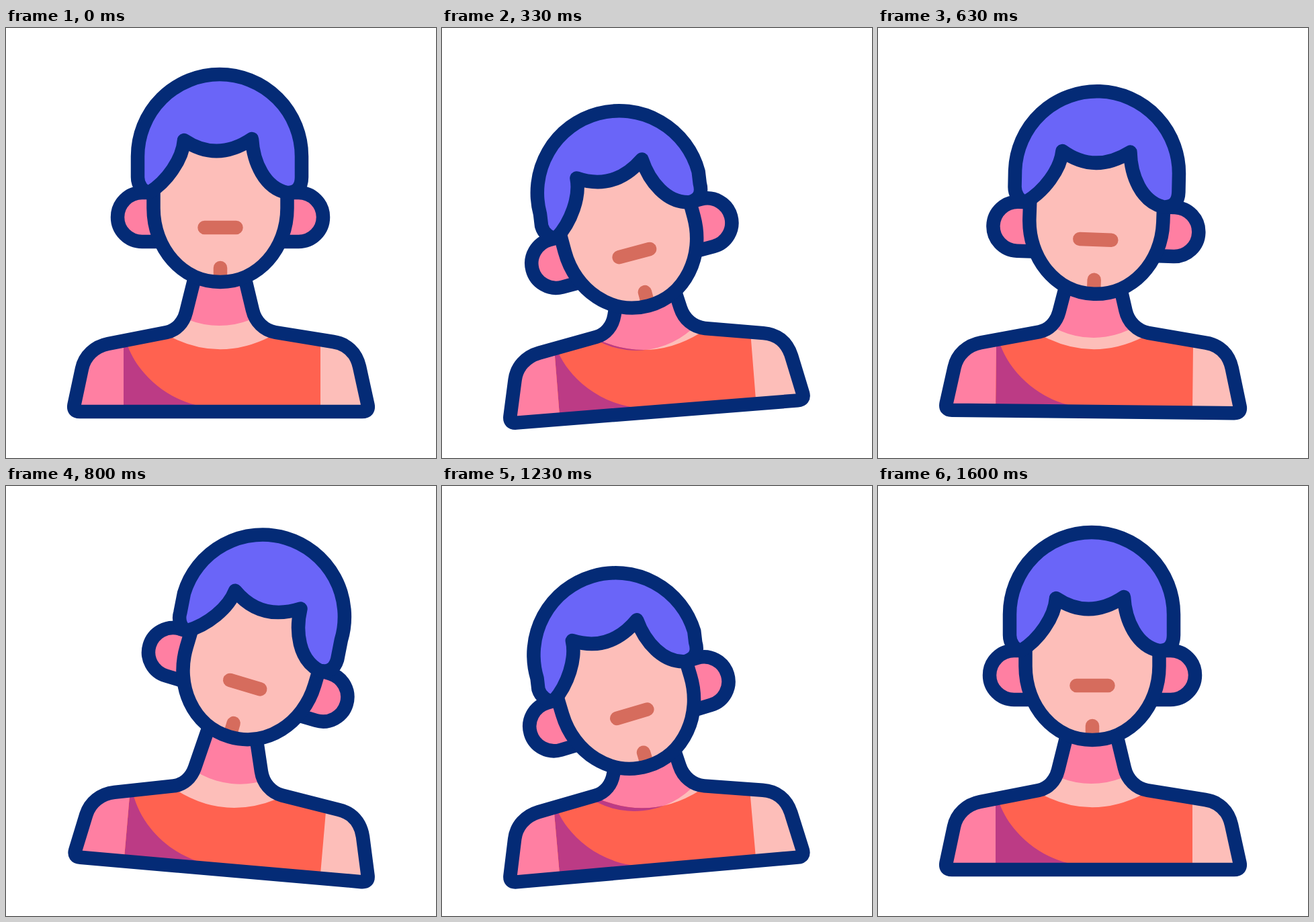
An HTML page that plays this animation: 640 px wide and 640 px high, repeating every 2 s.

```html
<!DOCTYPE html>
<html lang="en">
<head>
<meta charset="utf-8">
<title>Head tilt</title>
<style>
  html, body { margin: 0; width: 100%; height: 100%; overflow: hidden; background: #fff; }
  svg { display: block; width: 100vw; height: 100vh; }
  .line { fill: none; stroke: #042b76; stroke-width: 20.5; stroke-linecap: round; stroke-linejoin: round; }
  .skin { fill: #fdbeb9; }
  .pink { fill: #ff7fa2; }
  .shirt { fill: #ff6250; }
  .plum { fill: #bc3b85; }
  .hair { fill: #6a65f8; }
  .mark { fill: none; stroke: #d66c5d; stroke-width: 20.5; stroke-linecap: round; }
</style>
</head>
<body>
<svg viewBox="0 0 640 640">
  <defs>
    <path id="torso" d="M282 367L268 423C264 439 253 450 239 453L152 470C132 474 117 488 113 507L101.500 561Q99.500 571 110 571H530Q540.500 571 538.500 561L526 504C521 483 507 470 487 467L401 453C384 450 371 437 367 420L355 370"/>
    <path id="top" d="M175 440H200L238 456Q316 499 394 459L430 440H468V575H175Z"/>
    <path id="face" d="M219.500 175V268C219.500 328 262 378 319 378S418.500 328 418.500 268V175"/>
    <path id="ears" d="M225 318H202.500A36.500 36.500 0 0 1 202.500 245H225M414 318H435.500A36.500 36.500 0 0 0 435.500 245H414"/>
    <clipPath id="inTorso"><use href="#torso"/></clipPath>
    <clipPath id="inTop"><use href="#top"/></clipPath>
  </defs>

  <g id="body">
    <g clip-path="url(#inTorso)">
      <use href="#torso" class="skin"/>
      <ellipse class="shade pink" rx="117" ry="110"/>
      <rect class="pink" x="90" y="440" width="85.500" height="140"/>
      <use href="#top" class="shirt"/>
      <g clip-path="url(#inTop)">
        <path class="plum" d="M175 440L180 470C192 506 228 547 282 561V580H175Z"/>
        <ellipse class="shade plum" rx="117" ry="110"/>
      </g>
    </g>
    <use href="#torso" class="line"/>
  </g>

  <g id="head">
    <use href="#ears" class="pink"/>
    <use href="#ears" class="line"/>
    <use href="#face" class="skin"/>
    <path class="mark" d="M319 357V372M295.500 297H342.500"/>
    <use href="#face" class="line"/>
    <path id="hairFill" class="hair"/>
    <path id="hairLine" class="line"/>
  </g>
</svg>
<script>
  const $ = id => document.getElementById(id);
  const shades = document.querySelectorAll('.shade');

  // head angle, head dx, head dy, hair drop, body angle, shade dx, shade dy
  const rest = [0, 0, 0, 0, 0, 0, 0];
  const left = [-16.9, -36.7, 42.8, 15, -5.1, -28, 41];
  const right = [16.7, 37, -1.5, 1.5, 5, 27, 0];

  // key times in ticks of 1/30 s
  const keys = [
    [0, rest], [12.6, left], [24.4, right],
    [25.4, right], [36.2, left], [47.6, rest], [60, rest]
  ];
  const ease = u => u * u * (3 - 2 * u);

  function poseAt(tick) {
    const i = keys.findIndex(k => k[0] > tick);
    const [t0, a] = keys[i - 1];
    const [t1, b] = keys[i];
    const s = ease((tick - t0) / (t1 - t0));
    return a.map((v, j) => v + (b[j] - v) * s);
  }

  // the crown sinks and sways while the fringe stays on the face
  const hairPath = (drop, sway) =>
    `M196 222L${196 + sway} ${191 + drop}a122 122 0 0 1 244 0L440 222Q440 245 418 245` +
    'C385 238 368 200 366 165Q314 200 265 167C263 195 240 228 213 245C204 244 196 234 196 222Z';

  function draw(ms) {
    const tick = Math.floor((ms + 4) * 0.03) % 60;
    const [tilt, dx, dy, drop, lean, sx, sy] = poseAt(tick);
    $('head').setAttribute('transform', `translate(${dx} ${dy}) rotate(${tilt} 319 297)`);
    $('body').setAttribute('transform', `rotate(${lean} 320 571)`);
    const d = hairPath(drop, -0.17 * tilt);
    $('hairFill').setAttribute('d', d);
    $('hairLine').setAttribute('d', d);
    // undo the lean so that the shade follows the head
    const place = `rotate(${-lean} 320 571) translate(${317.5 + sx} ${333 + sy}) rotate(${tilt})`;
    for (const el of shades) el.setAttribute('transform', place);
  }

  const start = performance.now();
  function loop() {
    draw((performance.now() - start) % 2000);
    requestAnimationFrame(loop);
  }
  loop();
</script>
</body>
</html>
```
